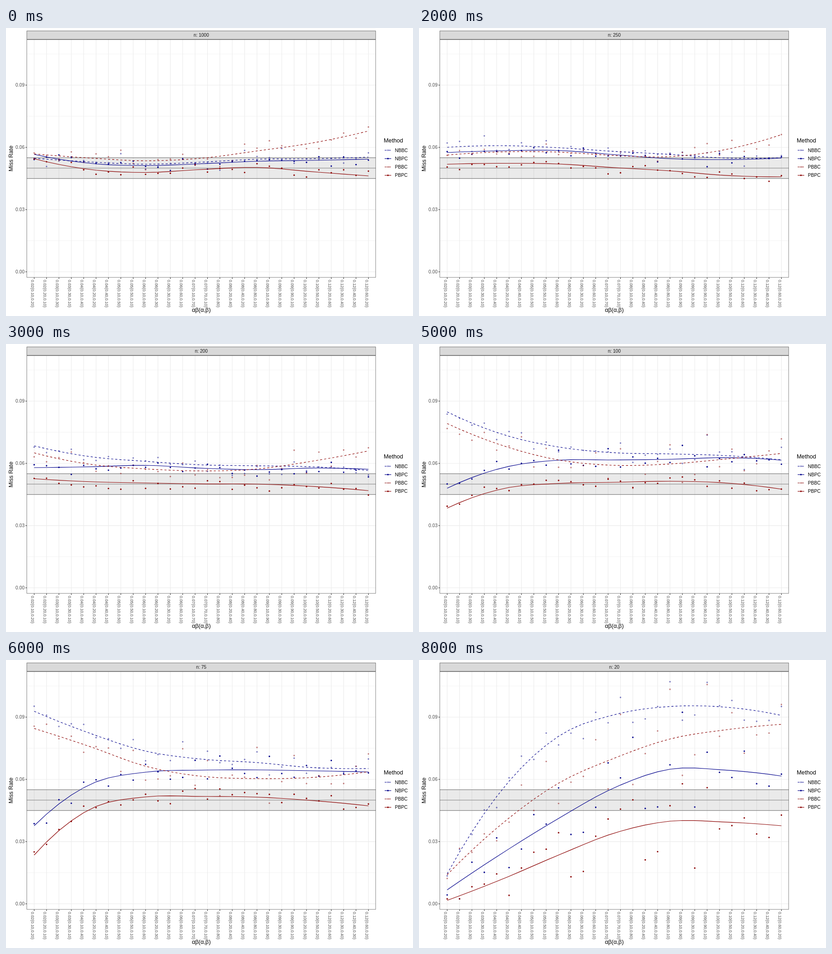
Animation, 890 px wide and 629 px high, one loop 9000 ms. Source, as an HTML page with a canvas:

```html
<!DOCTYPE html>
<html lang="en">
<head>
<meta charset="utf-8">
<title>Miss rate by sample size</title>
<style>
  html, body { margin: 0; width: 890px; height: 629px; overflow: hidden; background: #fff; }
  canvas { display: block; }
</style>
</head>
<body>
<canvas id="chart" width="890" height="629"></canvas>
<script>
const g = document.getElementById('chart').getContext('2d');
const FONT = '"Liberation Sans", Arial, sans-serif';
const BLUE = '#00008b', RED = '#8b0000';
const LEFT = 45.4, RIGHT = 808.5, STRIP = 5.9, TOP = 25.1, BOTTOM = 545.1;
const STEPS = [1000, 500, 250, 200, 150, 100, 75, 50, 20];

// lean: how far unequal alpha and beta pull the observations apart.
const METHODS = {
  NBBC: { color: BLUE, dashed: true, lean: .4 },
  NBPC: { color: BLUE, dashed: false, lean: -.4 },
  PBBC: { color: RED, dashed: true, lean: 1 },
  PBPC: { color: RED, dashed: false, lean: 0 }
};
const NAMES = Object.keys(METHODS);

// Every alpha, beta pair in tenths whose product stays within the studied range.
const PAIRS = [];
for (let a = 1; a < 10; a++) {
  for (let b = 1; b < 10; b++) {
    const p = a * b;
    if (p > 1 && p < 13 && !(p === 10 && a === 1)) PAIRS.push({ a: a / 10, b: b / 10, p });
  }
}
PAIRS.sort((u, v) => u.p - v.p || u.a - v.a);
const COUNT = PAIRS.length;

const xAt = i => 61.6 + i * 27.07;
const yAt = rate => 532.5 - rate * 4530;

// Smooth curve through evenly spaced knots, sampled at each category.
function smooth(k) {
  const n = k.length, gap = (COUNT - 1) / (n - 1);
  const p = [3 * k[0] - 3 * k[1] + k[2], ...k, 3 * k[n - 1] - 3 * k[n - 2] + k[n - 3]];
  return PAIRS.map((_, i) => {
    const s = Math.min(Math.floor(i / gap), n - 2), t = i / gap - s;
    const [a, b, c, d] = p.slice(s, s + 4);
    return b + .5 * t * (c - a + t * (2 * a - 5 * b + 4 * c - d + t * (3 * b - a - 3 * c + d)));
  });
}

// Trend knots per sample size, as heights on the stage.
const trends = {};
function add(n, ...curves) {
  trends[n] = {};
  NAMES.forEach((name, i) => trends[n][name] = smooth(curves[i]));
}
function between(n, from, to) {
  trends[n] = {};
  for (const name of NAMES) {
    trends[n][name] = trends[from][name].map((y, i) => (y + trends[to][name][i]) / 2);
  }
}
add(1000,
  [284.5, 292.5, 297.5, 293, 286.5, 285.5, 282],
  [276, 295.5, 300.5, 296.5, 291, 289, 286.5],
  [275, 284, 290, 284.5, 268.5, 251, 225],
  [285.5, 309, 315.5, 309, 304.5, 314, 323]);
add(250,
  [260.5, 257, 261.5, 269.5, 276, 284, 283.5],
  [272, 268, 267.5, 276.5, 285.5, 287.5, 284],
  [277.5, 270.5, 271, 278.5, 281, 265.5, 233],
  [297.5, 295.5, 297, 305, 312, 322, 325]);
add(150,
  [184.5, 235, 251, 258.5, 256, 252.5, 269],
  [268, 268.5, 262.5, 266, 263.5, 254.5, 263],
  [198, 255, 274.5, 276, 265, 246, 234],
  [291, 306, 310, 306, 300, 300, 315.5]);
add(75,
  [112, 160, 199, 216.5, 224, 235, 237],
  [362, 272, 245, 240.5, 240, 242, 244.5],
  [149.5, 189, 232, 254, 259, 256.5, 244],
  [426, 326, 299, 298, 299.5, 307, 318.5]);
add(50,
  [186, 119, 141, 185, 202.5, 217.5, 244],
  [443, 294, 233.5, 232, 231, 229, 241],
  [282, 188, 193, 226, 242.5, 247, 245],
  [499.5, 373, 300.5, 289, 298, 303, 308.5]);
add(20,
  [467, 281, 166.5, 119.5, 101.5, 103, 121],
  [502, 421, 346, 279, 238.5, 240.5, 253.5],
  [469, 356, 269, 214.5, 172.5, 152.5, 140.5],
  [525, 478, 426, 378, 352, 354, 362]);
between(500, 1000, 250);
between(200, 250, 150);
between(100, 150, 75);

// How far each value lies from the mean of its neighbours.
function deviation(values) {
  return values.map((v, i) => {
    const near = values.slice(Math.max(0, i - 3), i + 4);
    return v - near.reduce((sum, x) => sum + x) / near.length;
  });
}
const skew = deviation(PAIRS.map(({ a, b }) => b - a));
const peak = deviation(PAIRS.map(({ a, b }) => Math.max(a, b)));

function random(seed) {
  return () => {
    seed = seed + 0x6d2b79f5 | 0;
    let t = Math.imul(seed ^ seed >>> 15, 1 | seed);
    t = t + Math.imul(t ^ t >>> 7, 61 | t) ^ t;
    return (t ^ t >>> 14) >>> 0;
  };
}

// Observations: trend, pull of the alpha, beta pair, and noise shared by like methods.
function observe(n) {
  const next = random(n), noise = () => next() / 2 ** 31 - 1;
  const spread = 150 * Math.exp(-n / 100), floorEffect = 800 * Math.exp(-n / 20);
  const shared = PAIRS.map(() => [noise(), noise()]);
  const dots = {};
  for (const name of NAMES) {
    const { dashed, lean } = METHODS[name];
    const pull = dashed ? spread / 2 : floorEffect;
    dots[name] = trends[n][name].map((y, i) => {
      const jitter = (dashed ? 12 : 8) * (shared[i][+dashed] + noise());
      return Math.min(y + lean * spread * skew[i] - pull * peak[i] + jitter, yAt(.0024));
    });
  }
  return dots;
}

function line(points, color, width, dash = []) {
  g.strokeStyle = color;
  g.lineWidth = width;
  g.setLineDash(dash);
  g.beginPath();
  points.forEach(([x, y]) => g.lineTo(x, y));
  g.stroke();
  g.setLineDash([]);
}
const across = (y, color, width) => line([[LEFT, y], [RIGHT, y]], color, width);

function text(str, x, y, size, color, align = 'left', turn = 0) {
  g.save();
  g.translate(x, y);
  g.rotate(turn * Math.PI / 2);
  g.font = `${size}px ${FONT}`;
  g.fillStyle = color;
  g.textAlign = align;
  g.fillText(str, 0, 0);
  g.restore();
}

function dot(x, y, { color, dashed }) {
  g.globalAlpha = dashed ? .5 : 1;
  g.fillStyle = color;
  g.beginPath();
  g.arc(x, y, 1.65, 0, 7);
  g.fill();
  g.globalAlpha = 1;
}

// Border whose outer half is cut off.
function border(top, bottom) {
  g.strokeStyle = '#333';
  g.lineWidth = .6;
  g.strokeRect(LEFT + .3, top + .3, RIGHT - LEFT - .6, bottom - top - .6);
}

const trend = (points, { color, dashed }) => line(points, color, 1.13, dashed ? [4.5, 4.5] : []);

function drawGrid() {
  [.015, .045, .075, .105].forEach(v => across(yAt(v), '#ebebeb', .57));
  [0, .03, .06, .09].forEach(v => {
    const y = yAt(v);
    across(y, '#ebebeb', 1.13);
    line([[42.5, y], [LEFT, y]], '#333', 1.13);
    text(v.toFixed(2), 40.5, y + 3.6, 10.1, '#4d4d4d', 'right');
  });
  PAIRS.forEach(({ a, b, p }, i) => {
    const x = xAt(i);
    line([[x, TOP], [x, BOTTOM]], '#ebebeb', 1.13);
    line([[x, BOTTOM], [x, BOTTOM + 2.9]], '#333', 1.13);
    const label = `${(p / 100).toFixed(2)}(${a.toFixed(2)},${b.toFixed(2)})`;
    text(label, x - 6.6, 550, 8.9, '#4d4d4d', 'left', 1);
  });
  g.fillStyle = 'rgba(127,127,127,.16)';
  g.fillRect(LEFT, yAt(.055), RIGHT - LEFT, yAt(.045) - yAt(.055));
  [.045, .05, .055].forEach(v => across(yAt(v), '#7f7f7f', 1.13));
}

function drawFrame(n) {
  g.fillStyle = '#d9d9d9';
  g.fillRect(LEFT, STRIP, RIGHT - LEFT, TOP - STRIP);
  border(STRIP, TOP);
  border(TOP, BOTTOM);
  text('n: ' + n, 427, 19.3, 10.1, '#1a1a1a', 'center');
  text('αβ(α,β)', 427, 620.3, 12.7, '#000', 'center');
  text('Miss Rate', 15.3, 285, 12.7, '#000', 'center', -1);
}

function drawLegend() {
  text('Method', 826, 250, 12.7, '#000');
  NAMES.forEach((name, i) => {
    const y = 267 + i * 18.25;
    dot(835.2, y, METHODS[name]);
    trend([[828, y], [842.4, y]], METHODS[name]);
    text(name, 850.5, y + 3.7, 10.1, '#000');
  });
}

function draw(n) {
  const dots = observe(n);
  g.fillStyle = '#fff';
  g.fillRect(0, 0, 890, 629);
  drawGrid();
  for (const name of NAMES) dots[name].forEach((y, i) => dot(xAt(i), y, METHODS[name]));
  for (const name of NAMES) trend(trends[n][name].map((y, i) => [xAt(i), y]), METHODS[name]);
  drawFrame(n);
  drawLegend();
}

let shown;
const start = performance.now();
function tick() {
  const n = STEPS[Math.floor((performance.now() - start) / 1000) % STEPS.length];
  if (n !== shown) draw(shown = n);
  requestAnimationFrame(tick);
}
tick();
</script>
</body>
</html>
```
